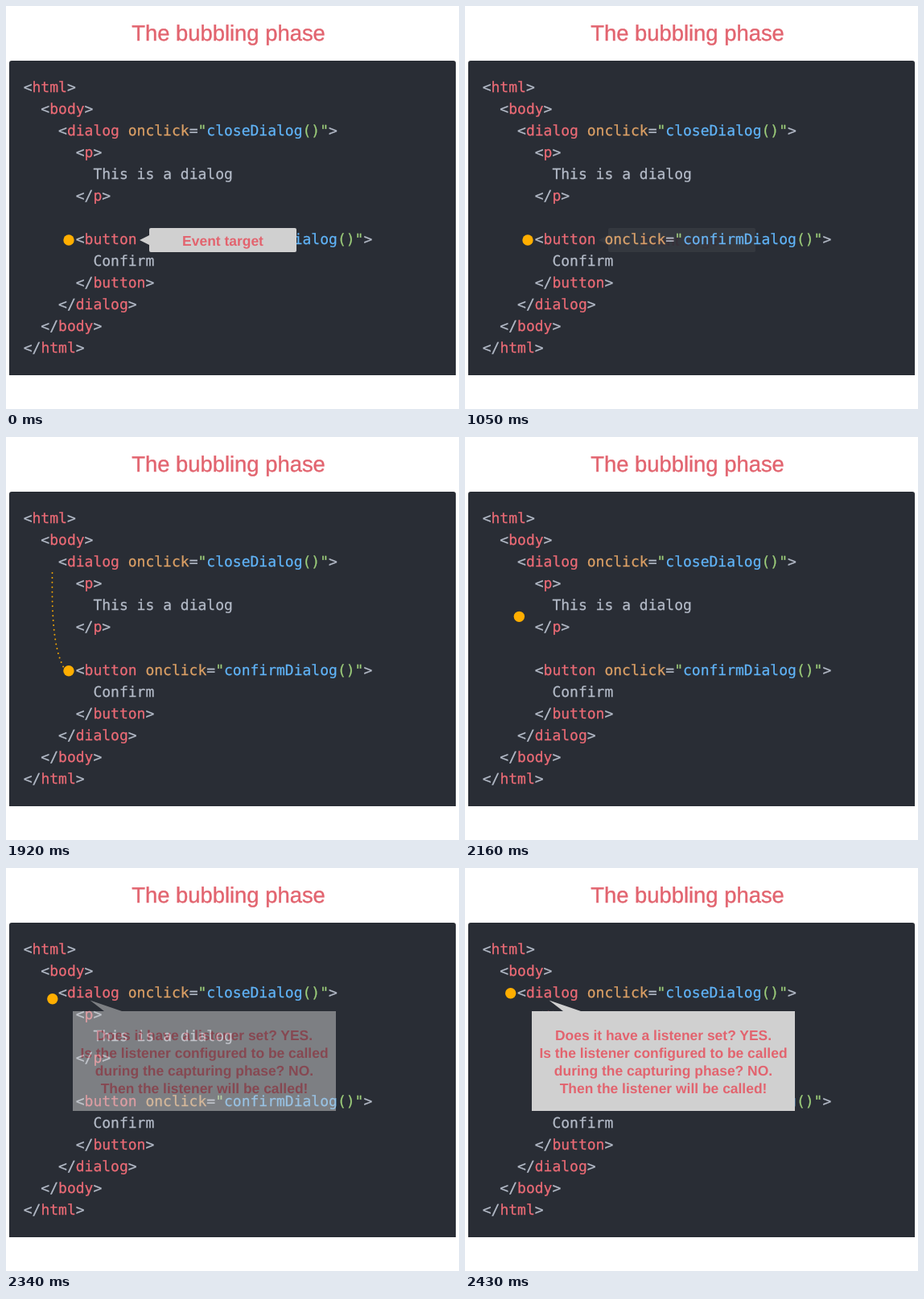
An HTML page for the animation above (8 s loop, 563 by 501 pixels).

```html
<!DOCTYPE html>
<html lang="en">
<head>
<meta charset="utf-8">
<title>The bubbling phase</title>
<style>
  html, body { margin: 0; width: 100%; height: 100%; overflow: hidden; background: #fff; }
  svg { display: block; text-rendering: geometricPrecision; }
  text, tspan { fill: currentColor; stroke: currentColor; }
  .sans { font-family: "Liberation Sans", Arial, sans-serif; text-anchor: middle; color: #e2646f; }
  .title { font-size: 27.4px; stroke-width: .4px; }
  .note { font-size: 17.45px; font-weight: bold; stroke: none; }
  .bubble { fill: #d0d0d0; }
  #code { font: 18px "DejaVu Sans Mono", monospace; color: #b4bbc8; stroke-width: .25px; }
  #code .tag { color: #ec6b76; }
  #code .attr { color: #dca065; }
  #code .func { color: #60b4f8; }
  #code .str { color: #9ccc7a; }
</style>
</head>
<body>
<svg width="563" height="501" viewBox="0 0 563 501">
  <text class="sans title" x="276.5" y="43">The bubbling phase</text>
  <path d="M4 459V71Q4 68 7 68H556Q559 68 559 71V459Z" fill="#292d35"/>
  <g id="code"></g>
  <path id="trail" d="M57.5 169C57 215 58 262 72 287" fill="none" stroke="#ffae00"
        stroke-width="2" stroke-linecap="round" stroke-dasharray="0 5.9"/>
  <circle id="dot" r="6.7" fill="#ffae00"/>
  <g id="target">
    <path class="bubble" d="M166 291L178 285V278Q178 276 180 276H359Q361 276 361 278V304Q361 306 359 306H180Q178 306 178 304V297Z"/>
    <text class="sans note" x="269.5" y="297.5">Event target</text>
  </g>
  <g id="answer">
    <path class="bubble" d="M104.5 164.5L144 178H410V302H83V178H122Z"/>
    <text class="sans note" x="246.5" y="214">Does it have a listener set? YES.</text>
    <text class="sans note" x="246.5" y="236">Is the listener configured to be called</text>
    <text class="sans note" x="246.5" y="258">during the capturing phase? NO.</text>
    <text class="sans note" x="246.5" y="280">Then the listener will be called!</text>
  </g>
</svg>
<script>
const LOOP = 8000, STEP = 30, MOVE = 540;
const $ = id => document.getElementById(id);

const source = `<html>
  <body>
    <dialog onclick="closeDialog()">
      <p>
        This is a dialog
      </p>

      <button onclick="confirmDialog()">
        Confirm
      </button>
    </dialog>
  </body>
</html>`;

function svg(name, parent, attrs, text = '') {
  const el = document.createElementNS('http://www.w3.org/2000/svg', name);
  for (const key in attrs) el.setAttribute(key, attrs[key]);
  el.textContent = text;
  return parent.appendChild(el);
}

function tokenClass(token, previous) {
  if (token === 'onclick') return 'attr';
  if (/Dialog$/.test(token)) return 'func';
  if (/^["()]+$/.test(token)) return 'str';
  return /<\/?$/.test(previous) ? 'tag' : '';
}

source.split('\n').forEach((line, row) => {
  const indent = line.search(/\S|$/);
  const text = svg('text', $('code'), { x: 21.7 + indent * 10.837, y: 107 + row * 27 });
  let previous = '';
  for (const token of line.trim().split(/(\w+|"|\(\))/)) {
    if (!token) continue;
    svg('tspan', text, { class: tokenClass(token, previous) }, token);
    previous = token;
  }
});

const clamp = v => Math.min(1, Math.max(0, v));
const ease = v => (1 - Math.cos(Math.PI * clamp(v))) / 2;
// Things leave in the first third of a move and arrive in the last third.
const leave = p => 1 - ease(p * 3);
const arrive = p => ease(p * 3 - 2);
// The dot travels slightly faster than the whole move, centred within it.
const travel = p => ease((p - .5) * 1.06 + .5);

function draw(now) {
  const t = Math.floor(now % LOOP / STEP) * STEP;
  const first = clamp((t - 900) / MOVE);
  const second = clamp((t - 1890) / MOVE);
  const k = travel(second);
  $('target').setAttribute('opacity', leave(first));
  $('trail').setAttribute('opacity', arrive(first) * leave(second));
  $('answer').setAttribute('opacity', arrive(second));
  $('dot').setAttribute('cx', 78 - 21.3 * k);
  $('dot').setAttribute('cy', 291 - 135.3 * k);
}

const start = performance.now();
function tick() {
  draw(performance.now() - start);
  requestAnimationFrame(tick);
}
tick();
</script>
</body>
</html>
```
